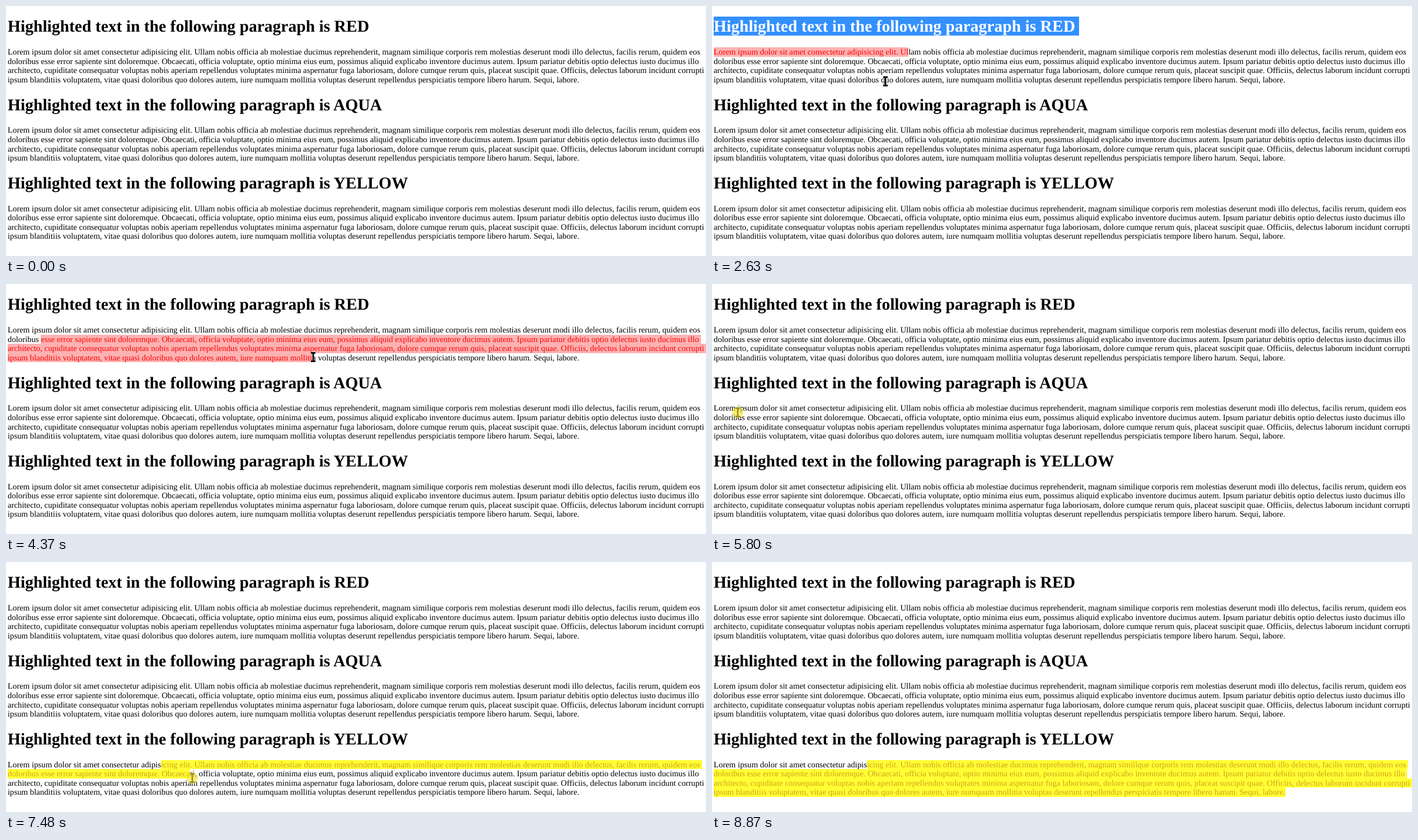
These frames come from a looping animation (1251x448 px, 9.58 s). An HTML page:

```html
<!DOCTYPE html>
<html lang="en">
<head>
<meta charset="utf-8">
<title>Highlighted text</title>
<style>
  html, body { margin: 0; width: 100%; height: 100%; overflow: hidden; background: #fff; }
  svg { display: block; }
  text {
    font-family: "Liberation Serif", "Times New Roman", serif;
    font-variant-ligatures: none;
    text-rendering: geometricPrecision;
    user-select: none;
  }
</style>
</head>
<body>
<svg id="stage" width="1251" height="448" viewBox="0 0 1251 448">
  <defs><clipPath id="picked"></clipPath></defs>
  <g id="plain"></g>
  <g id="marked" clip-path="url(#picked)"></g>
  <g id="mouse">
    <path d="M-4-7.5H4M0-7.5V7.5M-4 7.5H4" fill="none" stroke="#fff" stroke-width="4"/>
    <path d="M-4-7.5H4M0-7.5V7.5M-4 7.5H4" fill="none" stroke="#000" stroke-width="2.8"/>
    <circle id="press" r="10" fill="#f5e62e" fill-opacity=".64"/>
  </g>
</svg>
<script>
const LOOP = 9580, LEFT = 3, ZOOM = 0.9235, LAG = 10;
const BLOCK = 151.9 * ZOOM, LINE = 18 * ZOOM;

const paragraph = [
  "Lorem ipsum dolor sit amet consectetur adipisicing elit. Ullam nobis officia ab molestiae ducimus reprehenderit, magnam similique corporis rem molestias deserunt modi illo delectus, facilis rerum, quidem eos",
  "doloribus esse error sapiente sint doloremque. Obcaecati, officia voluptate, optio minima eius eum, possimus aliquid explicabo inventore ducimus autem. Ipsum pariatur debitis optio delectus iusto ducimus illo",
  "architecto, cupiditate consequatur voluptas nobis aperiam repellendus voluptates minima aspernatur fuga laboriosam, dolore cumque rerum quis, placeat suscipit quae. Officiis, delectus laborum incidunt corrupti",
  "ipsum blanditiis voluptatem, vitae quasi doloribus quo dolores autem, iure numquam mollitia voluptas deserunt repellendus perspiciatis tempore libero harum. Sequi, labore."
];
const blocks = [
  { name: "RED", back: "#fcb2b2", ink: "#ff0000" },
  { name: "AQUA", back: "#33ffff", ink: "#0000ff" },
  { name: "YELLOW", back: "#ffff33", ink: "#d2a01e" }
];

// each move runs from the previous place; sag bows it downwards
const move = (from, to, x, y, sag = 0) => ({ from, to, x, y, sag });
const moves = [
  move(0, 610, 114, 433),
  move(610, 800, 6, 15),
  move(1000, 1900, 10, 45),
  move(1900, 2440, 350, 87),
  move(2440, 2630, 310, 135),
  move(2630, 3150, 88, 111, 46),
  move(3400, 3560, 62, 101),
  move(3680, 4300, 549, 131),
  move(4370, 4620, 611, 165),
  move(4620, 5410, 48, 215, 48),
  move(5590, 5680, 46, 230),
  move(5830, 6390, 568, 270),
  move(6390, 6510, 600, 279),
  move(6580, 7050, 277, 367),
  move(7200, 7480, 333, 387),
  move(7480, 8480, 1115, 443),
  move(8480, 8870, 1124, 462)
];
// button down and up times
const drags = [[1700, 2440], [3560, 4340], [5680, 6510], [7050, 8870]];

const $ = id => document.getElementById(id);
const mouse = $("mouse"), press = $("press");

function add(parent, tag, attrs, text) {
  const el = document.createElementNS("http://www.w3.org/2000/svg", tag);
  set(el, attrs);
  if (text) el.textContent = text;
  return parent.appendChild(el);
}

function set(el, attrs) {
  for (const key in attrs) el.setAttribute(key, attrs[key]);
}

function makeRow(text, y, height, size, base, weight, back, ink) {
  const top = Math.round(y), bottom = Math.round(y + height);
  const look = { x: LEFT, y: y + base, "font-size": size, "font-weight": weight };
  const el = add($("plain"), "text", { ...look, fill: "#000" }, text);
  add($("marked"), "rect", { x: 0, y: top, width: 1251, height: bottom - top, fill: back });
  add($("marked"), "text", { ...look, fill: ink }, text);
  const edges = [LEFT];
  for (let i = 0; i < text.length; i++) edges.push(el.getEndPositionOfChar(i).x);
  return { y, top, bottom, edges, end: edges[text.length] + size / 4 };
}

const rows = blocks.map((b, i) => {
  const y = i * BLOCK;
  const title = "Highlighted text in the following paragraph is " + b.name;
  return [
    makeRow(title, y + 19.3, 34, 32 * ZOOM, 27, 700, "#3390ff", "#fff"),
    ...paragraph.map((line, k) =>
      makeRow(line, y + 74 + k * LINE, LINE, 16 * ZOOM, 13, 400, b.back, b.ink))
  ];
});
const bars = rows[0].map(() => add($("picked"), "rect", {}));

function pointer(t) {
  const i = Math.max(1, moves.findLastIndex(m => m.from <= t));
  const a = moves[i - 1], b = moves[i];
  const k = Math.min(1, Math.max(0, (t - b.from) / (b.to - b.from)));
  return {
    x: a.x + (b.x - a.x) * k,
    y: a.y + (b.y - a.y) * k + b.sag * 4 * k * (1 - k)
  };
}

// row and letter edge closest to a point
function locate(lines, { x, y }) {
  const row = Math.max(0, lines.findLastIndex(r => r.y <= y));
  const gap = e => Math.abs(e - x);
  return { row, x: lines[row].edges.reduce((a, b) => gap(b) < gap(a) ? b : a) };
}

function select(t) {
  const drag = drags.findLast(d => d[0] <= t);
  if (!drag) return bars.forEach(bar => set(bar, { width: 0, height: 0 }));
  const [down, up] = drag;
  const origin = pointer(down);
  const lines = rows[Math.floor(origin.y / BLOCK)];
  const first = locate(lines, origin);
  const last = locate(lines, pointer(Math.max(down, Math.min(t - LAG, up))));
  bars.forEach((bar, i) => {
    const { top, bottom, end } = lines[i];
    const on = i >= first.row && i <= last.row;
    const x = Math.round(i === first.row ? first.x : LEFT);
    const stop = Math.round(i === last.row ? last.x : end);
    set(bar, { x, y: top, width: on ? Math.max(0, stop - x) : 0, height: bottom - top });
  });
}

function draw(t) {
  select(t);
  const { x, y } = pointer(t);
  set(mouse, {
    transform: `translate(${x} ${y})`,
    visibility: t >= 610 && t < 8870 ? "visible" : "hidden"
  });
  set(press, { opacity: drags.some(([down, up]) => t >= down && t < up) ? 1 : 0 });
}

let start;
function tick(now) {
  start ??= now;
  draw((now - start) % LOOP);
  requestAnimationFrame(tick);
}
draw(0);
requestAnimationFrame(tick);
</script>
</body>
</html>
```
